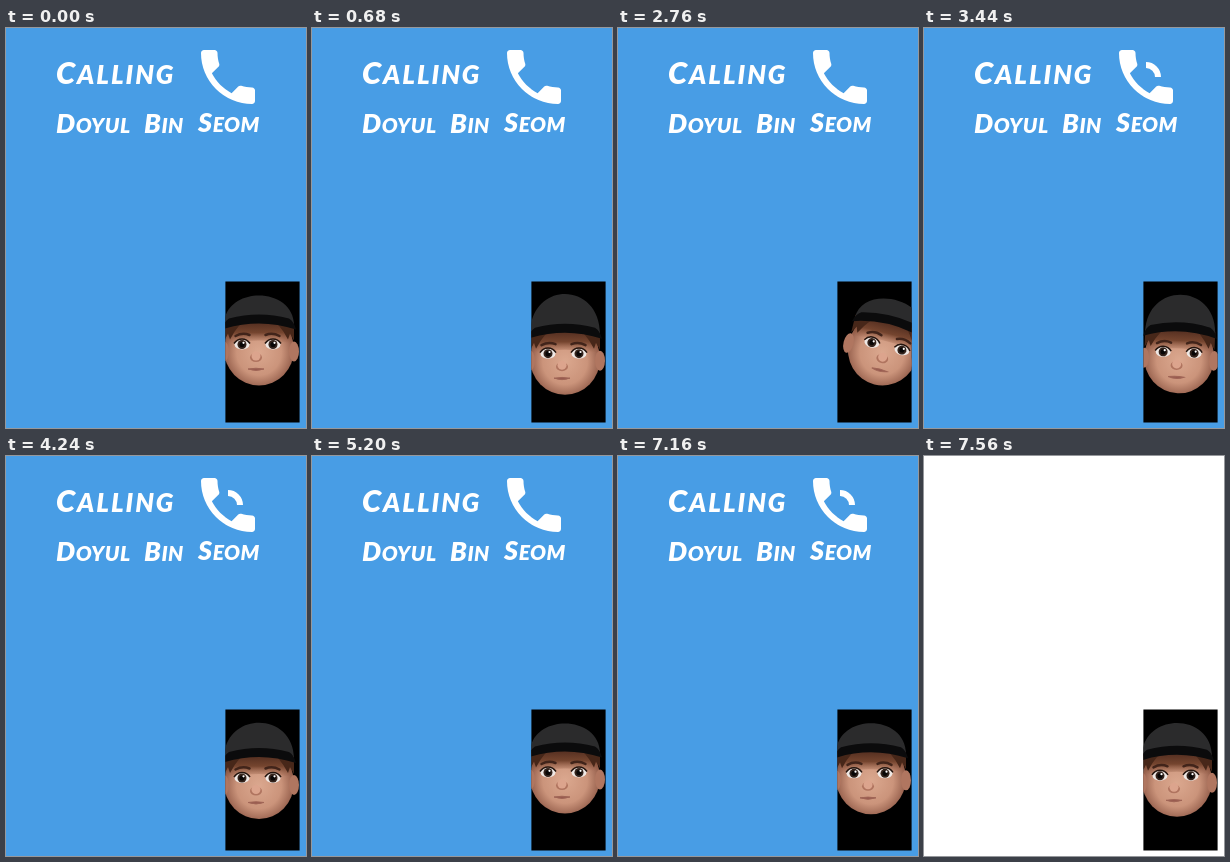
These frames come from a looping animation (300x400 px, 7640 ms). An HTML page:

```html
<!DOCTYPE html>
<html lang="en">
<head>
<meta charset="utf-8">
<title>Calling</title>
<style>
  html, body { margin: 0; width: 100%; height: 100%; overflow: hidden; background: #fff; }
  svg { display: block; width: 300px; height: 400px; }
  text { font: italic 900 26px Lato, "Open Sans", sans-serif; letter-spacing: 1.9px; fill: #fff; }
  .name { font-size: 21px; letter-spacing: .5px; }
  .big { font-size: 31px; }
  .name .big { font-size: 27px; }
</style>
</head>
<body>
<svg viewBox="0 0 300 400">
  <defs>
    <clipPath id="frame"><rect x="219.4" y="253.4" width="74.2" height="141.2"/></clipPath>
    <radialGradient id="skin" cy=".54" r=".53">
      <stop offset="0" stop-color="#dba88f"/>
      <stop offset=".6" stop-color="#cb947b"/>
      <stop offset="1" stop-color="#8d5745"/>
    </radialGradient>
    <linearGradient id="shade" x2="0" y2="1">
      <stop offset="0" stop-color="#4a281c"/>
      <stop offset=".55" stop-color="#75452f"/>
      <stop offset="1" stop-color="#9a624a" stop-opacity="0"/>
    </linearGradient>
    <g id="eye">
      <ellipse rx="7.5" ry="5" fill="#eee8e5"/>
      <circle r="4.5" fill="#33231c"/>
      <circle r="2.6" fill="#080606"/>
      <circle cx="1.5" cy="-1.7" r="1.1" fill="#fff"/>
      <path d="M-8-1Q-5-5.600 0-5.600T8-1" fill="none" stroke="#24150f" stroke-width="1.5"/>
    </g>
    <path id="brow" d="M8-9.500Q15-12.500 22-8.500" fill="none" stroke="#41241a" stroke-width="2.500" stroke-linecap="round"/>
    <g id="side">
      <ellipse cx="35" cy="2" rx="5" ry="10" fill="#b07660"/>
      <path d="M19-27H35V-9L31-16 29-10Q25-18 19-25Z" fill="#472719"/>
    </g>
  </defs>

  <g id="call">
    <rect width="300" height="400" fill="#489de5"/>
    <text x="50" y="56"><tspan class="big">C</tspan>ALLING</text>
    <g class="names">
      <text class="name" x="50" y="105"><tspan class="big">D</tspan>OYUL</text>
      <text class="name" x="138" y="105"><tspan class="big">B</tspan>IN</text>
      <text class="name" x="192" y="104"><tspan class="big">S</tspan>EOM</text>
    </g>
    <g transform="translate(186 13) scale(3)" fill="#fff">
      <path d="M6.620 10.790c1.440 2.830 3.760 5.140 6.590 6.590l2.200-2.200c.27-.27.67-.36 1.020-.24 1.120.37 2.330.57 3.570.57.55 0 1 .45 1 1V20c0 .55-.45 1-1 1A17 17 0 0 1 3 4c0-.55.45-1 1-1h3.500c.55 0 1 .45 1 1 0 1.250.2 2.450.57 3.570.11.35.03.74-.25 1.020z"/>
      <path id="ring" d="M15 12h2a5 5 0 0 0-5-5v2a3 3 0 0 1 3 3z"/>
    </g>
  </g>

  <g clip-path="url(#frame)">
    <rect x="219" y="253" width="75" height="142"/>
    <g id="head">
      <ellipse rx="35" ry="36" fill="url(#skin)"/>
      <path d="M-30-30H30L34-6Q0-12-34-6Z" fill="url(#shade)"/>
      <use href="#side"/>
      <use href="#side" transform="scale(-1 1)"/>
      <g id="features">
        <use href="#eye" x="-15.500"/>
        <use href="#eye" x="15.500"/>
        <use href="#brow"/>
        <use href="#brow" transform="scale(-1 1)"/>
        <g transform="translate(-1.500)">
          <ellipse cy="13" rx="6" ry="4.500" fill="#b0745f"/>
          <ellipse cy="11.500" rx="4.500" ry="4.500" fill="#dca48d"/>
          <path d="M-8 24.500Q0 23 8 24.500Q0 27.500-8 24.500" fill="#985a4f" stroke="#a06556"/>
        </g>
      </g>
      <path id="dome" fill="#2b2b2c"/>
      <path d="M-37-20Q-35-28-30-31Q0-39 30-31Q35-28 37-20Q0-32-37-20Z" fill="#0b0b0c"/>
    </g>
  </g>
</svg>
<script>
const LOOP = 7640, RING_STEP = 311, VIDEO_STEP = 136.5;
const $ = id => document.getElementById(id);
const place = (id, transform) => $(id).setAttribute('transform', transform);

function ramp(t, from, to) {
  const k = Math.min(1, Math.max(0, (t - from) / (to - from)));
  return k * k * (3 - 2 * k);
}
// Rises over a..b, holds, falls over c..d.
const pulse = (t, a, b, c, d) => ramp(t, a, b) - ramp(t, c, d);

function drawHead(t) {
  const nod = pulse(t, 100, 600, 1200, 1850) + pulse(t, 3000, 3560, 3850, 4700)
            + .35 * ramp(t, 6900, 7500);
  const turn = pulse(t, 1600, 2600, 2900, 3600);
  const crown = (6 - (54 + 11 * nod - 3 * turn)) / .75;
  place('head', `translate(${253 + 12 * turn} ${321.5 + 9.5 * nod}) rotate(${14 * turn})`);
  place('features', `translate(${-1.5 + 4.5 * turn} ${-5 + turn})`);
  $('dome').setAttribute('d', `M-35-24C-35 ${crown} 35 ${crown} 35-24Q0-36-35-24Z`);
}

function draw() {
  const t = performance.now() % LOOP;
  // The video runs at a lower frame rate than the call screen.
  const videoTime = 136 + Math.floor((t - 136) / VIDEO_STEP) * VIDEO_STEP;
  $('ring').style.opacity = Math.floor((t + 12) / RING_STEP) % 2;
  $('call').style.opacity = 1 - ramp(t, 7260, 7400);
  drawHead(videoTime);
  requestAnimationFrame(draw);
}
draw();
</script>
</body>
</html>
```
